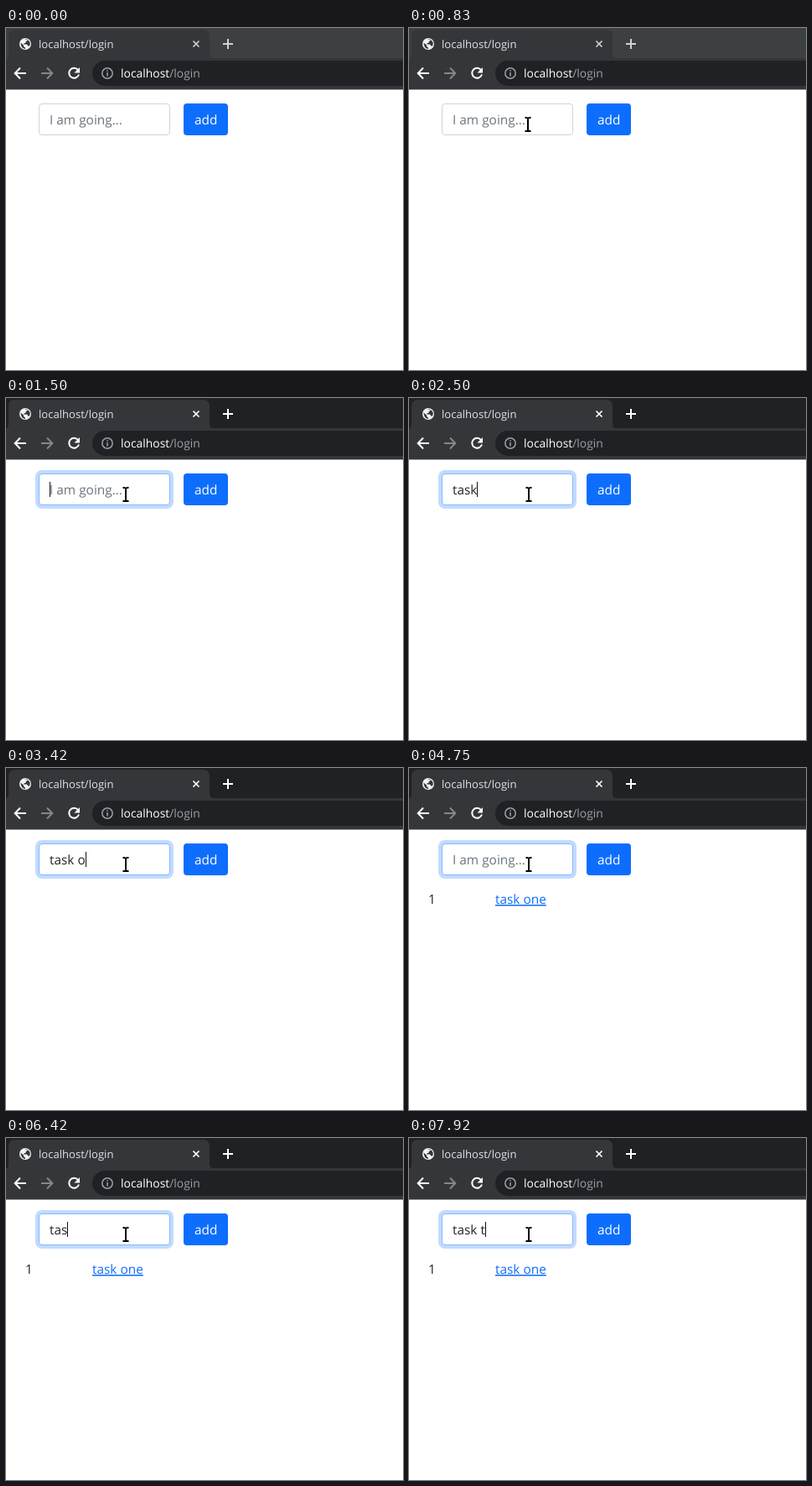
An HTML page that plays this animation: 474x408 px, repeating every 8000 ms.

```html
<!DOCTYPE html>
<html lang="en">
<head>
<meta charset="utf-8">
<title>Task list</title>
<style>
html, body { margin: 0; width: 100%; height: 100%; overflow: hidden; background: #fff; }
svg { display: block; }
text { font: 15.4px "Open Sans", "Noto Sans", sans-serif; white-space: pre; text-rendering: geometricPrecision; fill: #212529; }
.line { fill: none; stroke: #fff; stroke-width: 2; }
</style>
</head>
<body>
<svg width="474" height="408" viewBox="0 0 474 408">
  <!-- browser window -->
  <rect id="strip" width="474" height="37"/>
  <path d="M0 36.500Q3 36 3 31V10Q3 2 11 2H235Q243 2 243 10V31Q243 36 248 36H474V73.500H0Z" fill="#35363a"/>
  <circle cx="23" cy="19" r="7" fill="#f1f3f4"/>
  <path d="M17.500 17.500L21 20.500V22L23 23.500V25Q17.500 24 17.500 17.500ZM21.500 13.500H25.500V15L23.500 16.500V18H21.500V19.500H25L26.500 21.500H28Q30 17 26.500 14.500Z" fill="#35363a"/>
  <text x="39" y="24" style="font-size:13.1px;fill:#dee1e6">localhost/login</text>
  <g id="tabIcons" class="line">
    <path d="M223.500 15.500l7 7m0-7l-7 7" stroke-width="1.700"/>
    <path d="M259 19H271M265 13V25"/>
  </g>
  <path class="line" d="M24 54H11M17 47.500L10.700 54L17 60.500"/>
  <path class="line" d="M42 54H55M49 47.500L55.300 54L49 60.500" style="stroke:#85878a"/>
  <path class="line" d="M86 50A6 6 0 1 0 87 55.500"/>
  <path d="M88 47V53.500H81.500Z" fill="#fff"/>
  <rect x="103" y="39" width="400" height="30" rx="15" fill="#202124"/>
  <g class="line" style="stroke:#9aa0a6;stroke-width:1.500">
    <circle cx="121" cy="54" r="6.200"/>
    <path d="M121 53V57.500M121 50.300V51.800"/>
  </g>
  <text x="137" y="59" style="font-size:13.9px;fill:#9aa0a6"><tspan fill="#fff">localhost</tspan>/login</text>

  <!-- page -->
  <rect id="ring" x="35" y="86" width="165" height="46" rx="8" fill="#c2dbfe"/>
  <rect id="box" x="39.500" y="90.500" width="156" height="37" rx="3.500" fill="#fff"/>
  <text id="entry" x="52" y="115"></text>
  <rect id="caret" y="100" width="1" height="18" fill="#111"/>
  <rect x="212" y="90" width="53" height="38" rx="4" fill="#0d6efd"/>
  <text x="225" y="115" style="fill:#fff">add</text>
  <g id="row">
    <text x="23" y="162">1</text>
    <text x="103" y="162" style="fill:#0d6efd;text-decoration:underline">task one</text>
  </g>

  <!-- pointers -->
  <path id="arrow" d="M0 0V16L3.700 12.600L6.200 18.500L8.700 17.400L6.200 11.700H11.500Z" fill="#000" stroke="#fff"/>
  <g id="beam" fill="none">
    <path id="beamShape" d="M-3.500 -8H-1.500L0 -7L1.500 -8H3.500M0 -7V7M-3.500 8H-1.500L0 7L1.500 8H3.500" stroke="#fff" stroke-width="4"/>
    <use href="#beamShape" style="stroke:#000"/>
    <path d="M-3.500 -8H-1.500L0 -7L1.500 -8H3.500M0 -7V7M-3.500 8H-1.500L0 7L1.500 8H3.500" stroke="#000" stroke-width="2"/>
  </g>
</svg>
<script>
const LOOP = 8000, STEP = 1000 / 12, BLINK = 600;
const FOCUS = 1000, SUBMIT = 4750;
const HINT = "I am going...";
// [time, field value]
const typing = [
  [FOCUS, ""], [1580, "t"], [1830, "ta"], [2170, "tas"], [2500, "task"], [3000, "task "],
  [3420, "task o"], [3580, "task on"], [3670, "task one"], [SUBMIT, ""],
  [5920, "t"], [6080, "ta"], [6420, "tas"], [6830, "task"], [7080, "task "], [7830, "task t"]
];

const el = id => document.getElementById(id);
const show = (id, on) => el(id).setAttribute("visibility", on ? "visible" : "hidden");
const mix = (a, b, p) => a + (b - a) * p;
const ease = p => p * p * (3 - 2 * p);

function pointer(frame) {
  const k = Math.min(frame - 1, 9);
  if (k <= 5) {
    const p = ease(k / 5);
    return [mix(259, 24, p), mix(19, 106, p)];
  }
  const p = ease((k - 5) / 4);
  return [mix(24, 142, p), mix(106, 115, p)];
}

function draw(time) {
  const frame = Math.floor((time + 5) / STEP);
  const t = frame * STEP + 5;
  const active = t >= FOCUS;

  el("strip").setAttribute("fill", active ? "#202124" : "#3c4043");
  el("tabIcons").style.stroke = active ? "#fff" : "#d0d2d5";
  el("ring").setAttribute("opacity", Math.max(0, Math.min(1, (t - FOCUS) / 150)));
  el("box").setAttribute("stroke", active ? "#86b7fe" : "#ced4da");

  const [since, value] = typing.filter(k => k[0] <= t).pop() || [0, ""];
  const entry = el("entry");
  entry.textContent = value || HINT;
  entry.style.fill = value ? "#212529" : "#6c757d";
  const end = value ? entry.getComputedTextLength() : 0;
  el("caret").setAttribute("x", Math.round(52 + end));
  // clearing the field leaves the blink running from the last key
  const start = since === SUBMIT ? 3670 : since;
  show("caret", active && Math.floor((t - start) / BLINK) % 2 === 0);
  show("row", t >= SUBMIT);

  let [x, y] = pointer(frame);
  if (active) x = 143;
  const inField = x > 39 && x < 196 && y > 90 && y < 128;
  const inAddress = x > 135 && y > 39 && y < 69;
  const overText = inField || inAddress;
  for (const id of ["arrow", "beam"]) {
    el(id).setAttribute("transform", `translate(${Math.round(x)} ${Math.round(y)})`);
    show(id, frame > 0 && overText === (id === "beam"));
  }
}

const begin = performance.now();
function tick() {
  draw((performance.now() - begin) % LOOP);
  requestAnimationFrame(tick);
}
tick();
</script>
</body>
</html>
```
